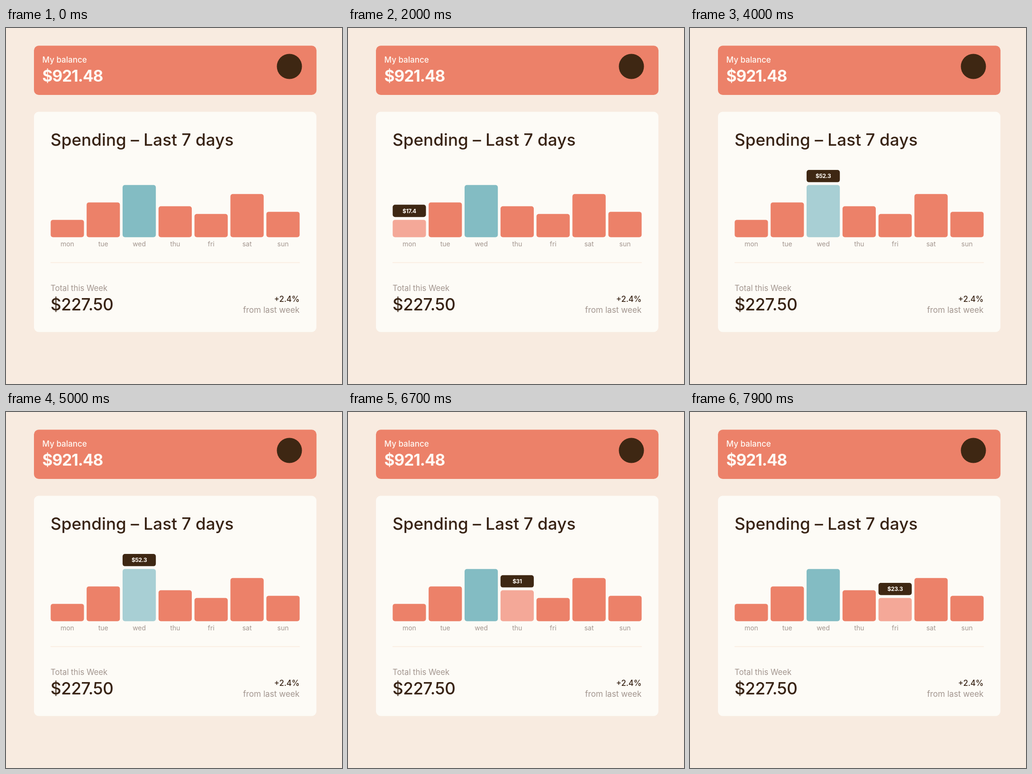
Animation, 709 px wide and 750 px high, one loop 8 s. Source, as an HTML page with a canvas:

```html
<!DOCTYPE html>
<html lang="en">
<head>
<meta charset="utf-8">
<title>Spending chart</title>
<style>
  html, body { margin: 0; width: 100%; height: 100%; overflow: hidden; background: #f8ebe0; }
  canvas { display: block; }
</style>
</head>
<body>
<canvas id="stage" width="709" height="750"></canvas>
<script>
const ctx = document.getElementById('stage').getContext('2d');
const LOOP = 8000;
const COLORS = {
  page: '#f8ebe0', card: '#fdfbf6', red: '#ec8169', redHover: '#f4a898',
  cyan: '#83bcc3', cyanHover: '#a8cfd4', brown: '#3e2713', ink: '#382314',
  muted: '#a3968f', line: '#fbeee3', light: '#fffaf4'
};
const DAYS = [
  ['mon', 17.4], ['tue', 34.9], ['wed', 52.3], ['thu', 31],
  ['fri', 23.3], ['sat', 43.3], ['sun', 25.5]
];
const PEAK = Math.max(...DAYS.map(day => day[1]));
const CHART = { left: 94.3, bottom: 440.7, step: 75.85, width: 70.2, scale: 2.1 };

// Start time of each hover state; -1 means no bar is hovered.
const HOVERS = [[0, -1], [400, 0], [2400, 1], [4000, 2], [5600, -1], [6200, 3], [7800, 4]];

function box(x, y, w, h, r, color) {
  ctx.fillStyle = color;
  ctx.beginPath();
  ctx.roundRect(x, y, w, h, r);
  ctx.fill();
}

function text(str, x, y, size, weight, color, align = 'left', spacing = 0) {
  ctx.font = `${weight} ${size}px Inter, sans-serif`;
  ctx.letterSpacing = `${spacing}px`;
  ctx.textAlign = align;
  ctx.fillStyle = color;
  ctx.fillText(str, x, y);
}

function drawBalance() {
  box(59, 37.2, 596.2, 103.8, 10, COLORS.red);
  text('My balance', 76.5, 73, 17, 500, COLORS.light);
  text('$921.48', 76.5, 113, 33.5, 700, COLORS.light, 'left', -1);
  ctx.fillStyle = COLORS.brown;
  ctx.beginPath();
  ctx.arc(598, 81, 26.5, 0, Math.PI * 2);
  ctx.fill();
}

function drawBar([name, amount], index, hovered) {
  const { left, bottom, step, width, scale } = CHART;
  const x = left + index * step;
  const center = x + width / 2;
  const height = amount * scale;
  const top = bottom - height;
  const kind = amount === PEAK ? 'cyan' : 'red';
  box(x, top, width, height, 5, COLORS[hovered ? kind + 'Hover' : kind]);
  text(name, center, 460, 14, 400, COLORS.muted, 'center');
  if (hovered) {
    box(x, top - 31.8, width, 25.8, 5, COLORS.brown);
    text('$' + amount, center, top - 14.4, 12, 700, COLORS.light, 'center', -0.4);
  }
}

function drawSpending(active) {
  box(59, 176.5, 596, 464, 10, COLORS.card);
  text('Spending – Last 7 days', 94, 248, 35, 500, COLORS.ink, 'left', 0.1);
  DAYS.forEach((day, i) => drawBar(day, i, i === active));
  box(94, 493.2, 526, 2, 0, COLORS.line);
  text('Total this Week', 94, 554, 16.7, 400, COLORS.muted);
  text('$227.50', 94, 595, 35, 500, COLORS.ink, 'left', -0.4);
  text('+2.4%', 619.5, 577, 16.8, 500, COLORS.ink, 'right');
  text('from last week', 619.5, 600, 17.2, 400, COLORS.muted, 'right');
}

function render(now) {
  const time = now % LOOP;
  const active = HOVERS.findLast(([start]) => time >= start)[1];
  ctx.fillStyle = COLORS.page;
  ctx.fillRect(0, 0, 709, 750);
  drawBalance();
  drawSpending(active);
  requestAnimationFrame(render);
}

requestAnimationFrame(render);
</script>
</body>
</html>
```
